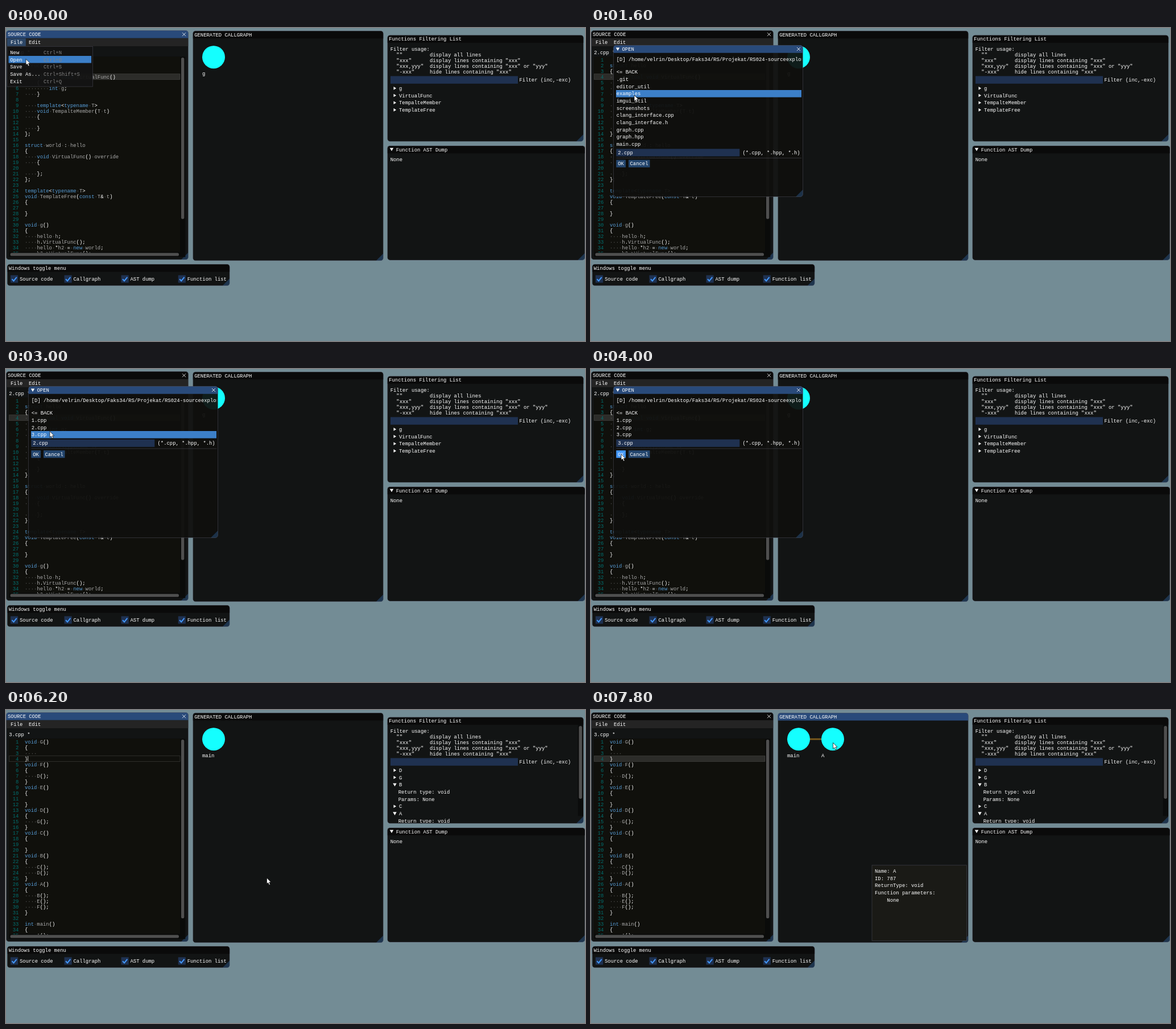
Recreate the animation shown at these times as an HTML page. Size 1018 by 550 pixels, loop 8 s.

```html
<!DOCTYPE html>
<html lang="en">
<head>
<meta charset="utf-8">
<title>Call graph explorer</title>
<style>
  html, body { margin: 0; width: 100%; height: 100%; overflow: hidden; background: #738c95; }
  svg { display: block; }
  #stage { width: 100%; height: 100%; }
  text { font: 8.89px "Liberation Mono", monospace; fill: #fff; }
  .end { text-anchor: end; fill: #007070; }
  .off { fill: #808080; }
  .key { fill: #569cd6; }
  .id { fill: #aaa; }
  .dot { fill: #5a5a5a; }
  .edge { fill: none; stroke: #6e6e80; stroke-opacity: .5; stroke-width: .67; }
  .frame { fill: #1f3150; }
  .btn { fill: #23456d; }
  .hot { fill: #4296fa; }
  .row { fill: #3c7fc8; }
  .grab { fill: #4f4f4f; }
  .grip { fill: #4296fa; fill-opacity: .25; }
  .cross { fill: none; stroke: #fff; stroke-width: .8; }
  .check { fill: none; stroke: #4296fa; stroke-width: 2; }
</style>
</head>
<body>
<svg id="stage" viewBox="0 0 1018 550"></svg>
<script>
const LOOP = 8000, STEP = 200, ROW = 12.667, CHAR = 5.334;
const OPEN = 600, FOLDER = 1800, PICK = 3400, LOADED = 4200, PARSED = 5400, HOVER = 6800, EXPAND = 7000;
const BLUE = '#294a7a', BLACK = '#0a0a0a';

const CODE_OLD = `
struct hello
{
    virtual void VirtualFunc()
    {
        int g;
    }

    template<typename T>
    void TempalteMember(T t)
    {

    }
};

struct world : hello
{
    void VirtualFunc() override
    {

    };
};

template<typename T>
void TemplateFree(const T& t)
{

}

void g()
{
    hello h;
    h.VirtualFunc();
    hello *h2 = new world;
    h2->VirtualFunc();`.split('\n');

const CODE_NEW = `void G()
{
    
}
void F()
{
    D();
}
void E()
{

}
void D()
{
    G();
}
void C()
{

}
void B()
{
    C();
    D();
}
void A()
{
    B();
    E();
    F();
}

int main()
{
    A();`.split('\n');

const ROOT_FILES = ['<= BACK', '.git', 'editor_util', 'examples', 'imgui_util', 'screenshots',
  'clang_interface.cpp', 'clang_interface.h', 'graph.cpp', 'graph.hpp', 'main.cpp'];
const SUB_FILES = ['<= BACK', '1.cpp', '2.cpp', '3.cpp'];

// pointer: time, x, y
const POINTER = [
  [0, 35, 54.5], [1000, 47, 74], [1200, 60, 93], [1400, 71, 107], [1600, 76, 118],
  [2200, 77, 106], [2400, 77, 96], [2600, 77, 90], [2800, 77, 100], [3000, 77, 109.5],
  [3200, 77, 112], [3600, 70, 122], [3800, 58, 140], [4000, 53, 149.5],
  [4600, 150, 205], [4800, 300, 265], [5000, 418, 291], [5400, 428, 294], [5600, 438, 296],
  [5800, 448, 297], [6000, 455, 296.5], [6200, 458.5, 295], [6400, 452, 280], [6600, 405, 150],
  [6800, 370, 62], [7000, 368, 58], [7400, 393, 60], [7600, 415, 59], [7800, 425.5, 57.5]
];

const esc = s => s.replace(/&/g, '&amp;').replace(/</g, '&lt;').replace(/ /g, '\u00a0');
// y is the middle of the capitals
const text = (x, y, s, cls = '') => `<text class="${cls}" x="${x}" y="${y + 2.9}">${esc(s)}</text>`;
const rect = (x, y, w, h, attrs) => `<rect x="${x}" y="${y}" width="${w}" height="${h}" ${attrs}/>`;
const fill = c => `fill="${c}"`;
const cls = c => `class="${c}"`;
const path = (d, attrs) => `<path d="${d}" ${attrs}/>`;
const clip = (x, y, w, h, body) =>
  `<svg x="${x}" y="${y}" width="${w}" height="${h}" viewBox="${x} ${y} ${w} ${h}">${body}</svg>`;
const cross = (x, y) => path(`M${x - 3} ${y - 3}l6 6m0-6l-6 6`, cls('cross'));
const arrow = (x, y, open) =>
  path(open ? `M${x - 3.2} ${y - 2.6}h6.4l-3.2 5.6z` : `M${x - 2} ${y - 2.8}v5.6l4.6-2.8z`, fill('#fff'));

function panel(x, y, w, h, title, { active, titleX = 2.5, bg = '#121414' } = {}) {
  const r = x + w, b = y + h;
  return rect(x, y, w, h, `rx="4.5" ${fill(bg)}`) +
    path(`M${x} ${y + 13.3}v-8.8a4.5 4.5 0 0 1 4.5-4.5H${r - 4.5}a4.5 4.5 0 0 1 4.5 4.5v8.8z`, fill(active ? BLUE : BLACK)) +
    path(`M${r} ${b - 12.5}V${b - 4.5}a4.5 4.5 0 0 1-4.5 4.5H${r - 12.5}z`, cls('grip')) +
    rect(x, y, w, h, 'rx="4.5" class="edge"') +
    text(x + titleX, y + 6.7, title);
}

const KEYWORDS = /^(struct|virtual|void|int|template|typename|const|new)$/;
function codeLine(s, y) {
  const spans = (s.match(/ +|\w+|[^\w ]+/g) || []).map(tok => {
    if (tok[0] === ' ') return `<tspan class="dot">${'·'.repeat(tok.length)}</tspan>`;
    const c = KEYWORDS.test(tok) ? 'key' : /\w/.test(tok) ? 'id' : '';
    return `<tspan class="${c}">${esc(tok)}</tspan>`;
  });
  return `<text x="33" y="${y + 2.9}">${spans.join('')}</text>`;
}

function sourceWindow(t) {
  const fresh = t >= LOADED, focus = fresh && t < EXPAND;
  const caret = focus && t < 6600 && (t - 4600 + LOOP) % 800 < 400 && t >= 4600;
  const lines = (fresh ? CODE_NEW : CODE_OLD)
    .map((s, i) => text(22.3, 55.6 + i * 10, `${i + 1}`, 'end') + codeLine(s, 55.6 + i * 10)).join('');
  return panel(.5, 4.5, 320, 402.5, 'SOURCE CODE', { active: t < OPEN || focus }) +
    cross(313, 11.2) +
    rect(.8, 18, 319.4, 14, fill('#242424')) +
    (t < OPEN ? rect(1.8, 18.3, 33, 13.4, fill('#2d4767')) : '') +
    text(8, 25.2, 'File') + text(40, 25.2, 'Edit') +
    text(5.3, 43, fresh ? '3.cpp *' : '2.cpp *') +
    rect(5.3, 50.5, 310, 352, fill('#0a0b0a')) +
    rect(5.3, 50.5, 301, 343, fill('#10100c')) +
    rect(5.5, 80.7, 300.5, 9.8, `fill="#808080" fill-opacity="${focus ? 0 : .25}" stroke="#a0a0a0" stroke-opacity=".3" stroke-width=".67"`) +
    clip(5, 50, 301, 344.5, lines) +
    (caret ? rect(38.3, 81, .8, 9, fill('#e0e0e0')) : '') +
    rect(308, 52, 5.3, fresh ? 314 : 283.5, 'rx="2.6" class="grab"') +
    rect(7.5, 395.2, 296.5, 5.3, 'rx="2.6" class="grab"');
}

function fileMenu() {
  const items = [['New', 'Ctrl+N'], ['Open', 'Ctrl+O'], ['Save', 'Ctrl+S'], ['Save As...', 'Ctrl+Shift+S'], ['Exit', 'Ctrl+Q']];
  return rect(2, 32.5, 150.5, 70.5, 'fill="#141414" fill-opacity=".94"') +
    rect(2, 32.5, 150.5, 70.5, cls('edge')) +
    rect(4.5, 49, 145.5, 12.5, cls('row')) +
    items.map(([name, keys], i) =>
      text(7.3, 43 + i * ROW, name) + text(66, 43 + i * ROW, keys, 'off')).join('');
}

function openDialog(t, px, py) {
  const files = t < FOLDER ? ROOT_FILES : SUB_FILES;
  const first = 77.3, field = first + (files.length - 1) * ROW + 15;
  const hover = Math.floor((py - first + 6.3) / ROW);
  const onOk = px > 44 && px < 61 && Math.abs(py - field - 19.3) < 7;
  const list = files.map((name, i) =>
    (i === hover && px > 44 ? rect(44, first - 6.3 + i * ROW, 326, ROW, cls('row')) : '') +
    text(44.7, first + i * ROW, name)).join('');
  return panel(39.5, 30.5, 333, 266, 'OPEN', { active: true, titleX: 15, bg: 'rgba(15,15,13,.94)' }) +
    arrow(47, 37, true) + cross(365, 37) +
    clip(44, 46, 326.5, 16, text(44.7, 55, '[D] /home/velrin/Desktop/Faks34/RS/Projekat/RS024-sourceexplorer')) +
    list +
    rect(44.3, field - 6.6, 217, 13.2, cls('frame')) +
    text(47.3, field, t < PICK ? '2.cpp' : '3.cpp') + text(266.5, field, '(*.cpp, *.hpp, *.h)') +
    rect(44.3, field + 9.3, 326, .7, 'fill="#6e6e80" fill-opacity=".5"') +
    rect(44.3, field + 12.7, 16.7, 13.2, cls(onOk ? 'hot' : 'btn')) + text(47.3, field + 19.3, 'OK') +
    rect(66, field + 12.7, 37.5, 13.2, cls('btn')) + text(68.5, field + 19.3, 'Cancel');
}

function node(x, label) {
  return `<circle cx="${x}" cy="51.2" r="20" fill="#14ffff"/>` + text(x - 20, 80, label);
}

function nodeInfo(name, id, type) {
  const rows = [`Name: ${name}`, `ID: ${id}`, `ReturnType: ${type}`, 'Function parameters:', '    None'];
  return rect(494, 272.8, 166.5, 132.7, fill('#1a1a16')) +
    rect(494, 272.8, 166.5, 132.7, cls('edge')) +
    rows.map((s, i) => text(499, 283.2 + i * ROW, s)).join('');
}

function graphWindow(t, px) {
  const open = t >= EXPAND;
  let info = '';
  if (t >= HOVER && px < 385) info = nodeInfo('main', 802, 'int');
  if (open && px > 405) info = nodeInfo('A', 787, 'void');
  return panel(328.7, 5.2, 334.6, 403.5, 'GENERATED CALLGRAPH', { active: open }) +
    (open ? rect(384, 49.8, 22, 2.8, fill('#7d5a1c')) + node(425, 'A') : '') +
    node(365, t < PARSED ? 'g' : 'main') + info;
}

function functionWindow(t) {
  const usage = ['Filter usage:', '  ""         display all lines', '  "xxx"      display lines containing "xxx"',
    '  "xxx,yyy"  display lines containing "xxx" or "yyy"', '  "-xxx"     hide lines containing "xxx"'];
  const parsed = t >= PARSED;
  // + closed, - open, blank for a detail line
  const tree = parsed
    ? ['+D', '+G', '-B', ' Return type: void', ' Params: None', '+C', '-A', ' Return type: void']
    : ['+g', '+VirtualFunc', '+TempalteMember', '+TemplateFree'];
  const rows = tree.map((s, i) => {
    const y = 106.2 + i * ROW, leaf = s[0] === ' ';
    return (leaf ? '' : arrow(683.5, y - .3, s[0] === '-')) + text(leaf ? 689.7 : 691, y, s.slice(1));
  }).join('');
  return panel(670.7, 12.7, 344.6, 186.6, 'Functions Filtering List') +
    usage.map((s, i) => text(675.7, 37 + i * 10, s)).join('') +
    rect(676, 84.5, 224, 13.3, cls('frame')) + text(902.5, 91.5, 'Filter (inc,-exc)') +
    clip(672, 98, 334, 100.3, rows) +
    (parsed ? rect(1005.5, 26.3, 9.5, 160, fill('#0b0c0c')) + rect(1007.3, 28, 5.5, 128, 'rx="2.7" class="grab"') : '');
}

function astWindow() {
  return panel(670.7, 206.9, 347, 201, 'Function AST Dump', { titleX: 15 }) +
    arrow(678, 213.3, true) + text(675.7, 231, 'None');
}

function toggleWindow() {
  const boxes = [[8, 'Source code'], [102.5, 'Callgraph'], [202.5, 'AST dump'], [302.7, 'Function list']];
  return panel(2.2, 415.2, 391, 37.6, 'Windows toggle menu') +
    boxes.map(([x, label]) => rect(x, 434.4, 13.2, 13.2, cls('frame')) +
      path(`M${x + 2.5} 441.3l3 3.2 5.3-6.6`, cls('check')) + text(x + 16, 441, label)).join('');
}

function pointer(x, y) {
  return `<g transform="translate(${x} ${y})">` +
    path('M0 0v10.6l2.4-2.2 1.8 4 1.9-.9-1.8-3.8h3.3z', 'fill="#fff" stroke="#000" stroke-width=".7"') + '</g>';
}

const stage = document.getElementById('stage');
const start = performance.now();
let shown = -1;

function draw(t) {
  const [, px, py] = POINTER.filter(p => p[0] <= t).pop();
  stage.innerHTML = rect(0, 0, 1018, 550, fill('#738c95')) +
    graphWindow(t, px) + functionWindow(t) + astWindow() + toggleWindow() + sourceWindow(t) +
    (t < OPEN ? fileMenu() : t < LOADED ? openDialog(t, px, py) : '') +
    pointer(px, py);
}

function tick() {
  const step = Math.floor((performance.now() - start) % LOOP / STEP);
  if (step !== shown) draw((shown = step) * STEP);
  requestAnimationFrame(tick);
}
tick();
</script>
</body>
</html>
```
